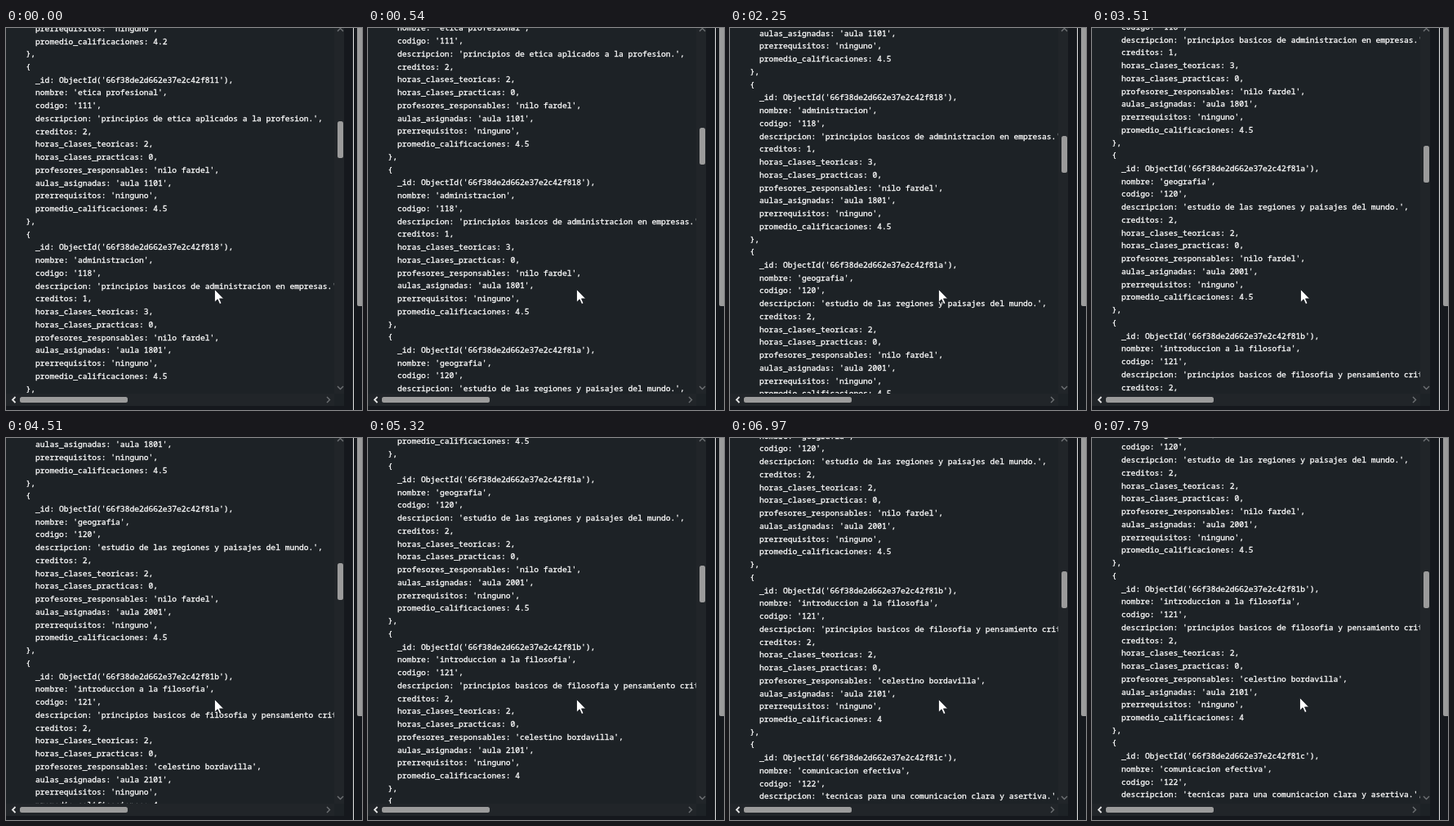
These frames come from a looping animation (436 px wide and 467 px high, 8 s). An HTML page:

```html
<!DOCTYPE html>
<html lang="es">
<head>
<meta charset="utf-8">
<title>Consulta de cursos</title>
<style>
  html, body { margin: 0; width: 100%; height: 100%; overflow: hidden; background: #15181d; }
  svg { display: block; width: 436px; height: 467px; }
  text { font: 500 9.62px "Noto Sans Mono", "DejaVu Sans Mono", monospace; fill: #fff; stroke: #fff; stroke-width: .3px; white-space: pre; }
</style>
</head>
<body>
<svg viewBox="0 0 436 467" xmlns="http://www.w3.org/2000/svg">
  <defs><clipPath id="pane"><rect width="401.5" height="447"/></clipPath></defs>
  <rect width="436" height="467" fill="#15181d"/>
  <rect width="414" height="462" fill="#1d2226"/>
  <rect x="402" width="12" height="447" fill="#212529"/>
  <rect y="447" width="402" height="15" fill="#212529"/>

  <g clip-path="url(#pane)"><g id="lines"></g></g>

  <rect id="thumb" x="406" y="114" width="7" height="45" rx="2.5" fill="#9b9b9b"/>
  <rect x="17" y="451" width="132" height="7" rx="2.5" fill="#9b9b9b"/>
  <g fill="none" stroke="#6e7174" stroke-width="1.4">
    <path d="M406 4l3.5-3.5 3.5 3.5"/>
    <path d="M406 438l3.5 3.5 3.5-3.5"/>
    <path d="M393 451l3.5 3.5-3.5 3.5"/>
    <path d="M11.5 451l-3.5 3.5 3.5 3.5" stroke="#e4e4e4" stroke-width="1.8"/>
  </g>

  <rect x="425" width="1" height="467" fill="#e6e6e6"/>
  <rect x="430" y="-10" width="8" height="350" rx="2" fill="#9b9b9b"/>

  <path id="cursor" d="M.5 .5V16.2L4.1 12.8 6.7 18.6 9 17.6 6.5 11.9H11.6Z" fill="#fff" stroke="#15181d" stroke-width=".8"/>
</svg>
<script>
  const LOOP = 8000, PITCH = 15.74, FIRST = 51, COL = 5.772;
  const NS = 'http://www.w3.org/2000/svg';
  const $ = id => document.getElementById(id);

  const NILO = 'nilo fardel', CELESTINO = 'celestino bordavilla';
  const courses = [
    ['11', 111, 'etica profesional', 'principios de etica aplicados a la profesion.', 2, 2, NILO, 4.5],
    ['18', 118, 'administracion', 'principios basicos de administracion en empresas.', 1, 3, NILO, 4.5],
    ['1a', 120, 'geografia', 'estudio de las regiones y paisajes del mundo.', 2, 2, NILO, 4.5],
    ['1b', 121, 'introduccion a la filosofia', 'principios basicos de filosofia y pensamiento critico.', 2, 2, CELESTINO, 4],
    ['1c', 122, 'comunicacion efectiva', 'tecnicas para una comunicacion clara y asertiva.', 2, 2, CELESTINO, 4]
  ];

  function addLine(row, indent, str) {
    const el = document.createElementNS(NS, 'text');
    el.setAttribute('x', 13 + indent * COL);
    el.setAttribute('y', Math.round(FIRST + row * PITCH));
    el.textContent = str;
    $('lines').append(el);
  }

  function addCourse([id, code, name, about, credits, hours, teacher, mean], i) {
    const top = i * 13;
    addLine(top, 2, '{');
    [
      `_id: ObjectId('66f38de2d662e37e2c42f8${id}'),`,
      `nombre: '${name}',`,
      `codigo: '${code}',`,
      `descripcion: '${about}',`,
      `creditos: ${credits},`,
      `horas_clases_teoricas: ${hours},`,
      'horas_clases_practicas: 0,',
      `profesores_responsables: '${teacher}',`,
      `aulas_asignadas: 'aula ${(code - 100) * 100 + 1}',`,
      "prerrequisitos: 'ninguno',",
      `promedio_calificaciones: ${mean}`
    ].forEach((s, k) => addLine(top + 1 + k, 4, s));
    addLine(top + 12, 2, '},');
  }

  addLine(-3, 4, "prerrequisitos: 'ninguno',");
  addLine(-2, 4, 'promedio_calificaciones: 4.2');
  addLine(-1, 2, '},');
  courses.forEach(addCourse);

  // Scroll flicks: first step, last step (ms), step count, distance, decay per step
  const flicks = [
    [90, 900, 9, 91.7, 0.3],
    [1350, 2620, 14, 94.1, 0.3],
    [2990, 3870, 10, 128.6, 0.3],
    [4240, 5780, 17, 109.6, 0.3],
    [6150, 7330, 13, 68.5, 0.345]
  ];

  function flickAt(t, [start, end, n, dist, decay]) {
    if (t < start) return 0;
    const k = Math.min(n, Math.floor((t - start + 10) / (end - start) * n));
    const run = x => 1 - Math.exp(-(x + 0.5) * decay);
    return dist * run(k) / run(n);
  }

  function draw(t) {
    const scroll = flicks.reduce((sum, f) => sum + flickAt(t, f), 0);
    $('lines').setAttribute('transform', `translate(0 ${-Math.round(scroll)})`);
    $('thumb').setAttribute('y', Math.round(114 + scroll * 0.1));
    $('cursor').setAttribute('transform', t < 7790 ? 'translate(255 319)' : 'translate(254 317)');
  }

  const began = performance.now();
  function tick() {
    draw((performance.now() - began) % LOOP);
    requestAnimationFrame(tick);
  }
  tick();
</script>
</body>
</html>
```
